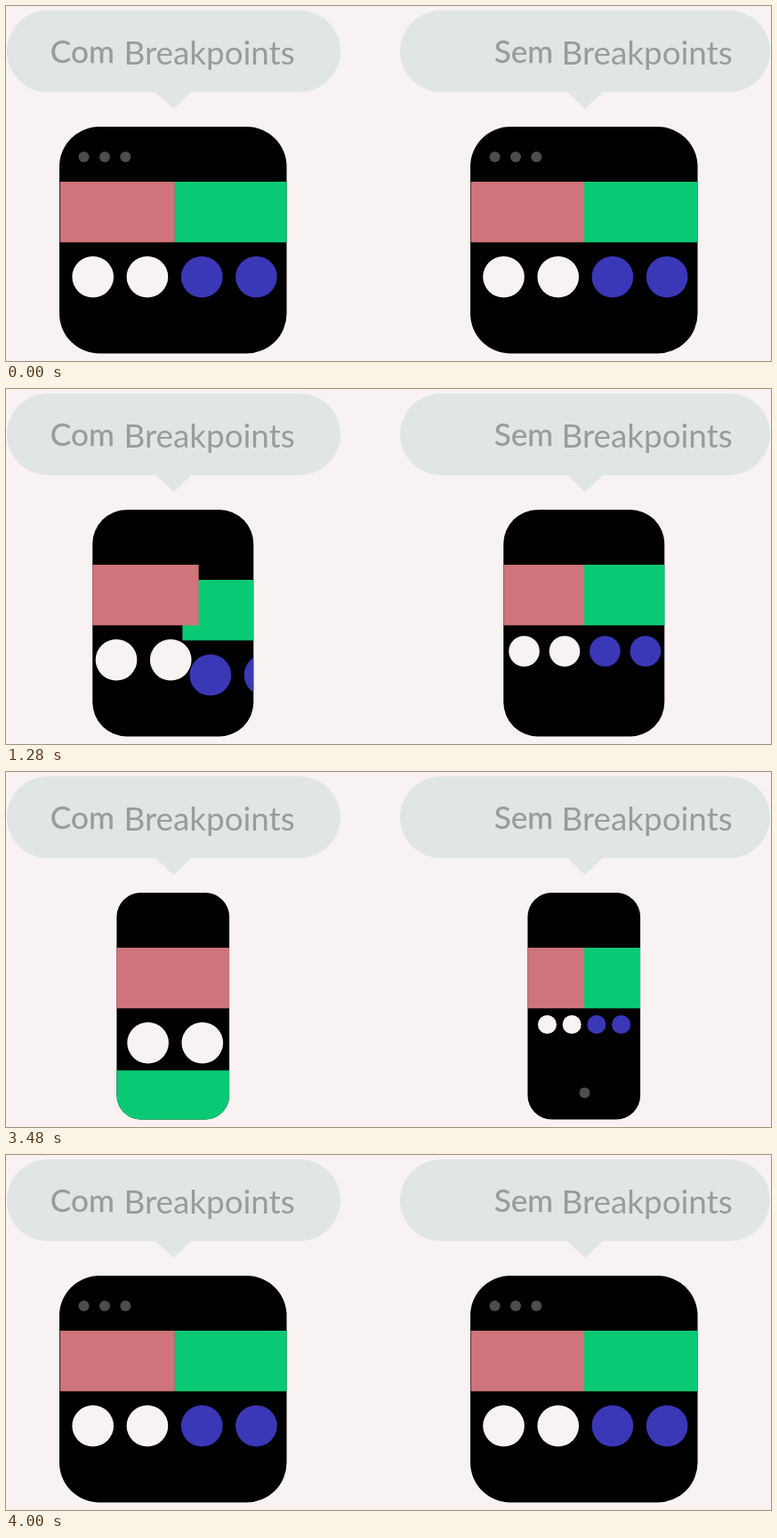
Animation, 860 px wide and 400 px high, one loop 4140 ms. Source, as an HTML page:

```html
<!DOCTYPE html>
<html lang="pt">
<head>
<meta charset="utf-8">
<title>Breakpoints</title>
<style>
  html, body { margin: 0; width: 100%; height: 100%; overflow: hidden; background: #f8f2f2; }
  svg { display: block; width: 860px; height: 400px; }
  text { font: 36.8px Lato, "Open Sans", sans-serif; fill: #9a9b9a; }
  .lead { font-size: 35.2px; stroke: #9a9b9a; stroke-width: .3; }
  .bubble { fill: #e0e6e6; }
  .red { fill: #ce747a; }
  .green { fill: #0ac974; }
  .white { fill: #f8f2f2; }
  .blue { fill: #3b38b8; }
  .dot { fill: #4d4d4d; }
</style>
</head>
<body>
<svg viewBox="0 0 860 400">
  <defs>
    <clipPath id="clipA"><rect class="frame" y="136" height="255.5"/></clipPath>
    <clipPath id="clipB"><rect class="frame" y="136" height="255.5"/></clipPath>
  </defs>

  <g class="bubble">
    <rect x="1" y="5" width="375" height="92" rx="46"/>
    <path d="M167 96h42l-20.500 20z"/>
    <rect x="443" y="5" width="416" height="92" rx="46"/>
    <path d="M630 96h42l-21 20z"/>
  </g>
  <text class="lead" x="49.800" y="64">Com</text>
  <text x="132.600" y="66">Breakpoints</text>
  <text class="lead" x="548.800" y="64">Sem</text>
  <text x="624.600" y="66">Breakpoints</text>

  <g clip-path="url(#clipA)">
    <rect x="50" y="130" width="276" height="270"/>
    <g class="bar">
      <circle class="dot" cx="87.500" cy="170" r="6"/>
      <circle class="dot" cx="111" cy="170" r="6"/>
      <circle class="dot" cx="134.300" cy="170" r="6"/>
    </g>
    <circle class="dot home" cx="188.500" cy="361.500" r="6"/>
    <rect id="green" class="green" y="198" width="160" height="68.300"/>
    <g id="blues" class="blue">
      <circle cy="305.200" r="23.300"/>
      <circle cx="61.200" cy="305.200" r="23.300"/>
    </g>
    <rect id="red" class="red" y="198" width="129" height="68.300"/>
    <g id="whites" class="white">
      <circle cy="305.200" r="23.300"/>
      <circle cx="61.200" cy="305.200" r="23.300"/>
    </g>
  </g>

  <g clip-path="url(#clipB)">
    <rect x="512" y="130" width="276" height="270"/>
    <g class="bar">
      <circle class="dot" cx="549.500" cy="170" r="6"/>
      <circle class="dot" cx="573" cy="170" r="6"/>
      <circle class="dot" cx="596.300" cy="170" r="6"/>
    </g>
    <circle class="dot home" cx="650.500" cy="361.500" r="6"/>
    <rect id="half" class="red" y="198" height="68.300"/>
    <rect class="green" x="650" y="198" width="130" height="68.300"/>
    <circle class="white scaled"/>
    <circle class="white scaled"/>
    <circle class="blue scaled"/>
    <circle class="blue scaled"/>
  </g>
</svg>
<script>
  const LOOP = 4140, STEP = 40, LAST = 13, SHRINK = 1040, GROW = 3480;
  const all = selector => [...document.querySelectorAll(selector)];
  const set = (el, attrs) => { for (const k in attrs) el.setAttribute(k, attrs[k]); };
  const mix = (a, b, p) => a + (b - a) * p;
  const move = (el, x, y) => set(el, { transform: `translate(${x} ${y})` });

  const frames = all('.frame'), bars = all('.bar'), homes = all('.home'), scaled = all('.scaled');
  const [red, green, whites, blues, half] =
    ['red', 'green', 'whites', 'blues', 'half'].map(id => document.getElementById(id));

  const ease = (x, skew) => { const u = x ** skew; return u * u * (3 - 2 * u); };

  // Share of the way from the wide window (0) to the phone (1), for each part.
  function pose(t) {
    const progress = start =>
      t < start ? 0 : Math.min(1, (Math.floor((t - start) / STEP) + .2) / (LAST + .2));
    const growing = t >= GROW;
    const x = progress(growing ? GROW : SHRINK);
    const share = (shrinkSkew, growSkew) => growing ? 1 - ease(x, growSkew) : ease(x, shrinkSkew);
    const content = share(1.057, 1.08);
    return {
      body: share(.786, 1.1),
      content,
      wrap: content ** (growing ? 3.19 : 2.45),
      circles: share(.971, .957)
    };
  }

  function draw(t) {
    const { body, content, wrap, circles } = pose(t);
    const width = mix(255.5, 126.6, body);

    [187.75, 649.75].forEach((center, i) =>
      set(frames[i], { x: center - width / 2, width, rx: mix(45, 27, body ** 1.9) }));
    bars.forEach(bar => move(bar, 0, -68 * body));
    homes.forEach(home => move(home, 0, 90 * (1 - body)));

    const left = mix(60.7, 124, content);
    const wrapX = left + 128.7 - 146 * wrap, wrapY = 138.4 * wrap;
    move(red, left, 0);
    move(whites, mix(97.7, 159.6, content), 0);
    move(green, wrapX, wrapY);
    move(blues, wrapX + mix(30.8, 32.3, content), wrapY);

    const edge = mix(522.6, 586, body);
    set(half, { x: edge, width: 650 - edge });
    scaled.forEach((circle, i) => set(circle, {
      cx: mix(651.3, 650, circles) + (i - 1.5) * mix(61.2, 27.7, circles),
      cy: mix(305.2, 284.5, circles),
      r: mix(23.3, 10.5, circles)
    }));
  }

  const start = performance.now();
  function tick() {
    draw((performance.now() - start) % LOOP);
    requestAnimationFrame(tick);
  }
  tick();
</script>
</body>
</html>
```
